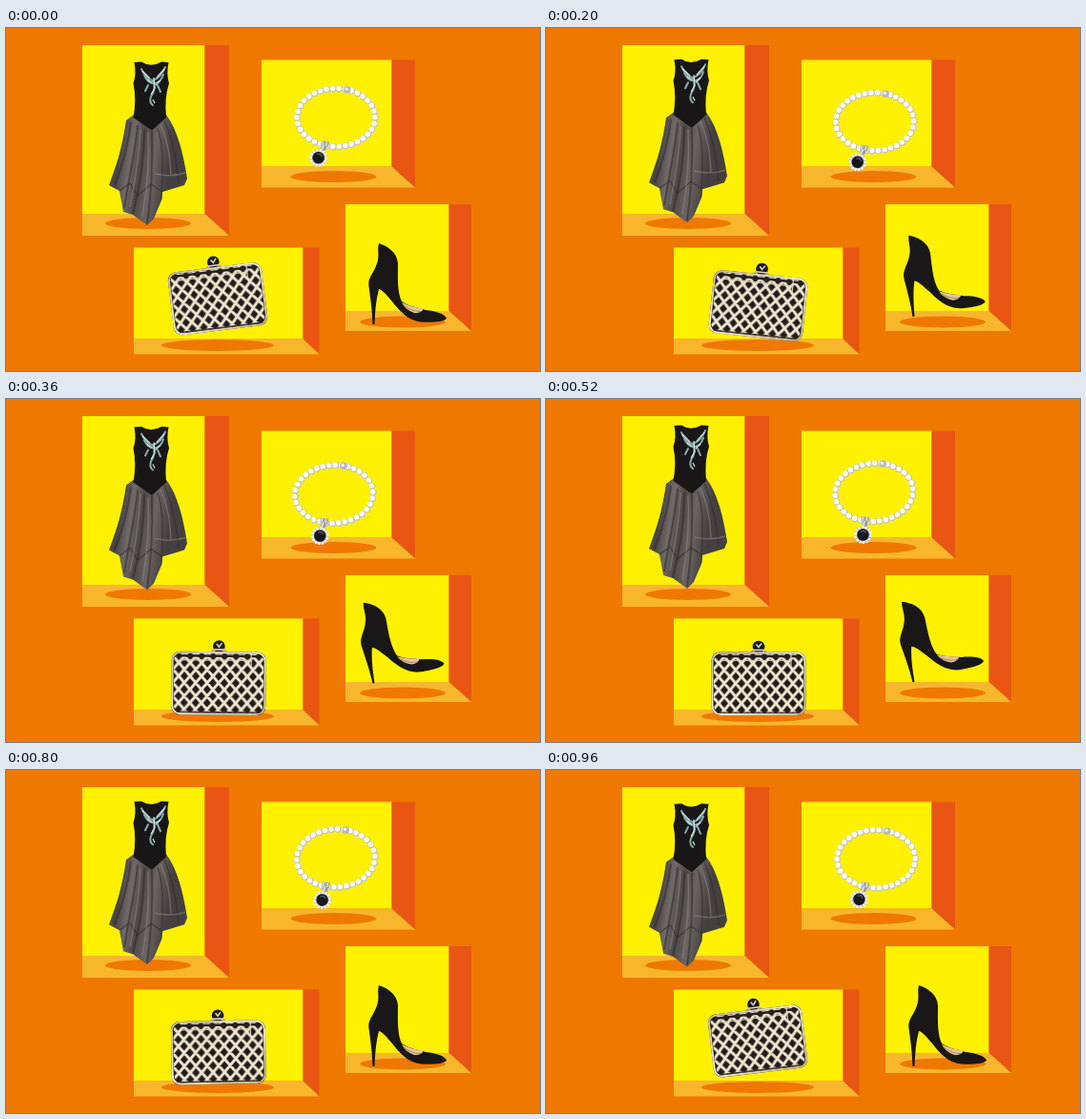
An HTML page for the animation above (1 s loop, 560 by 360 pixels).

```html
<!DOCTYPE html>
<html lang="en">
<head>
<meta charset="utf-8">
<title>Floating accessories</title>
<style>
  html, body { margin: 0; width: 100%; height: 100%; overflow: hidden; background: #ef7800; }
  svg { display: block; width: 560px; height: 360px; }
</style>
</head>
<body>
<svg viewBox="0 0 560 360" fill="none">
  <defs>
    <linearGradient id="tulle" x1="108" x2="190" y1="0" y2="12" gradientUnits="userSpaceOnUse">
      <stop offset="0" stop-color="#3f3b3b"/>
      <stop offset=".2" stop-color="#5f5a57"/>
      <stop offset=".36" stop-color="#474342"/>
      <stop offset=".5" stop-color="#716b68"/>
      <stop offset=".64" stop-color="#4d4947"/>
      <stop offset=".8" stop-color="#6a6562"/>
      <stop offset="1" stop-color="#444040"/>
    </linearGradient>
    <linearGradient id="gold" x1="0" x2="1" y1="0" y2="1">
      <stop offset="0" stop-color="#c9b895"/>
      <stop offset=".45" stop-color="#f6efdc"/>
      <stop offset="1" stop-color="#c6b48f"/>
    </linearGradient>
    <pattern id="lattice" width="12" height="14" x="-6" y="-7" patternUnits="userSpaceOnUse">
      <path d="M-3-3.5 15 17.5M-3 17.5 15-3.5M-3 10.5 3 17.5M9-3.5 15 3.5M-3 3.5 3-3.5M9 17.5 15 10.5" stroke="#f0e6cd" stroke-width="3"/>
    </pattern>
  </defs>

  <g id="rooms"></g>

  <g id="dress">
    <path fill="url(#tulle)" d="M134 91 126 97C123 117 119 134 114 148L108 165 119 171 123 193 133 196 148 207 155 200 163 181 164 172 187 165 190 158C186 132 180 107 168 91L153 100Z"/>
    <g stroke="#2d2a2a" stroke-opacity=".55">
      <path d="M131 99C128 122 122 145 114 165M138 102C136 130 129 155 124 189M145 106C145 140 140 170 133 195M153 108C154 140 153 170 148 205" stroke-width="2"/>
      <path d="M159 105C166 125 164 150 163 180M166 97C175 118 179 140 181 163M119 171 130 163 138 176 152 164 164 172" stroke-width="1.5"/>
    </g>
    <g stroke="#918b87" stroke-opacity=".5" stroke-width="1.5">
      <path d="M141 106C140 130 136 158 130 188M149 109C151 145 147 175 143 198M162 101C172 125 172 140 173 155M156 153Q174 157 188 152"/>
    </g>
    <path fill="#191617" d="M134.5 36 142 35.5Q152 42 163 35.5L170.5 36Q168 48 171 58 166 73 168 94L153 107.5 133.5 94Q137 75 133.5 58 137 49 134.5 36Z"/>
    <g stroke="#83aeac" stroke-width="2" stroke-linecap="round">
      <path d="M142 43Q146 53 154 55 163 52 167 41M145 50Q150 59 155 58 162 58 165 49M154 55Q158 64 152 72 150 78 154 81M149 60 146 66M159 60 162 67"/>
    </g>
    <path d="M143 45 151 53M166 43 158 52M155 52 156 63 152 70M148 54 153 57M162 55 157 60M154 75 156 79" stroke="#d7e6e3" stroke-width="1.2"/>
  </g>

  <g id="bracelet">
    <g stroke-linecap="round" stroke-dasharray="0 1">
      <ellipse rx="41" ry="30.5" pathLength="34" stroke="#c9c6b4" stroke-width="7"/>
      <ellipse cx="-.4" cy="-.5" rx="41" ry="30.5" pathLength="34" stroke="#fffef8" stroke-width="5.4"/>
    </g>
    <circle cx="11.5" cy="-29.5" r="3.8" fill="#b9b9b4"/>
    <circle cx="10.8" cy="-30.3" r="1.8" fill="#eee"/>
    <path d="M-16 26.5-8 28" stroke="#a9a9a4" stroke-width="6"/>
    <path d="M-14 24-15 29M-10 25-11 31" stroke="#e8e8e4" stroke-width="1.2"/>
    <g id="pendant">
      <path d="M0 0V7" stroke="#9c9c98" stroke-width="5"/>
      <path d="M-1 0V7" stroke="#ecece8" stroke-width="1.5"/>
      <circle cy="14.5" r="9" fill="#b3b3ac"/>
      <circle cy="14.5" r="8" pathLength="14" stroke="#f3f3ee" stroke-width="3" stroke-linecap="round" stroke-dasharray="0 1"/>
      <circle cy="14.5" r="6.2" fill="#17171c"/>
      <path d="M-3 12 0 10 3 12" stroke="#5d6070" stroke-width="1.2"/>
    </g>
  </g>

  <g id="bag">
    <path d="M-9-32Q-7-37 0-37T9-32Z" fill="#b9a67f"/>
    <circle cy="-38.5" r="6.3" fill="#1d1a1a"/>
    <path d="M-6-35H6" stroke="#e4d8ba" stroke-width="1.6"/>
    <path d="M-2.5-41 0-38 3-42" stroke="#d8d4ca" stroke-width="1.6"/>
    <rect x="-49.5" y="-33" width="99" height="66.5" rx="9" fill="#211d1c"/>
    <rect x="-47" y="-31" width="94" height="62" rx="8" fill="url(#lattice)"/>
    <rect x="-48.5" y="-32" width="97" height="64.5" rx="8.5" stroke="url(#gold)" stroke-width="2"/>
    <path d="M-42-28.5H42" stroke="#26211f" stroke-width="2.5"/>
    <path d="M-40-24H33M34-32V-18" stroke="#d9ccac" stroke-width="1.2"/>
    <path d="M-44 30.5H44" stroke="#3a332d" stroke-width="1.2"/>
  </g>

  <g id="shoe">
    <path fill="#191718" d="M391 226C400 229 410 235 411 247 411 261 410 276 415 287 424 293 432 293 440 296 450 297 460 300 462 304.500 460 309 445 309 435 308.500 421 307 412 296 405 287 399 280 395 275 391 274 388 285 387 298 386.500 311H384.500C384 295 382 283 380.500 271 379 262 386 257 389 247 392 239 389 232 391 226Z"/>
    <path fill="#e2c79b" d="M415 288Q425 293 438 294.500 435 300 428 299 419 296 415 288Z"/>
    <path d="M417 291Q426 298 435 297.500" stroke="#b88852"/>
  </g>
</svg>
<script>
const $ = id => document.getElementById(id);
const STEP = 40, LOOP = 1000;

// left, top, back-wall right and bottom, outer right and bottom, shadow x, y, radius
const rooms = [
  [80, 18, 208.5, 195, 234, 218, 149, 205, 45],
  [268, 33.5, 404.5, 145.5, 429, 167.5, 343.5, 156, 45],
  [134, 230.5, 311.5, 326.5, 328.5, 342.5, 222, 333, 59],
  [356, 185, 464.5, 297, 488, 318, 416, 308.5, 45]
];
$('rooms').innerHTML = rooms.map(([l, t, r, b, R, B, x, y, w]) => `
  <path fill="#fff100" d="M${l} ${t}H${r}V${b}H${l}Z"/>
  <path fill="#e95513" d="M${r} ${t}H${R}V${B}L${r} ${b}Z"/>
  <path fill="#f8b62d" d="M${l} ${b}H${r}L${R} ${B}H${l}Z"/>
  <ellipse fill="#ef7800" cx="${x}" cy="${y}" rx="${w}" ry="6"/>`).join('');

const ramp = (t, a, b) => Math.min(1, Math.max(0, (t - a) / (b - a)));
const smooth = (t, a, b) => { const u = ramp(t, a, b); return u * u * (3 - 2 * u); };
const wave = (t, peak) => Math.cos((t - peak) / LOOP * 2 * Math.PI);
const place = (id, x, y, turn = 0) =>
  $(id).setAttribute('transform', `translate(${x} ${y}) rotate(${turn})`);

function draw(t) {
  place('dress', 0, 4 * wave(t, 0) - 4);

  const tilt = 2.5 * wave(t, 60) - 2.5;
  place('bracelet', 345.3 + 1.2 * wave(t, 920), 96.5 + 3.75 * wave(t, 350), tilt);
  place('pendant', -12, 29, 19 + 11 * wave(t, 100) - tilt);

  const hop = 1 - smooth(t, 0, 400) + smooth(t, 740, 980);
  const rock = -7 + 13 * smooth(t, 0, 200) - 6 * smooth(t, 200, 400) - 7 * smooth(t, 740, 980);
  place('bag', 223 - hop, 298.5 - 14.5 * hop, rock);

  const rise = Math.sin(ramp(t, 0, 500) * Math.PI / 2);
  const lift = 14 * rise * (1 - smooth(t, 540, 700));
  const turn = -12 * rise * (1 - smooth(t, 540, 760));
  $('shoe').setAttribute('transform', `translate(0 ${-lift}) rotate(${turn} 385.5 311)`);
}

const start = performance.now();
function tick() {
  const t = (performance.now() - start) % LOOP;
  draw(Math.floor(t / STEP) * STEP);
  requestAnimationFrame(tick);
}
tick();
</script>
</body>
</html>
```
